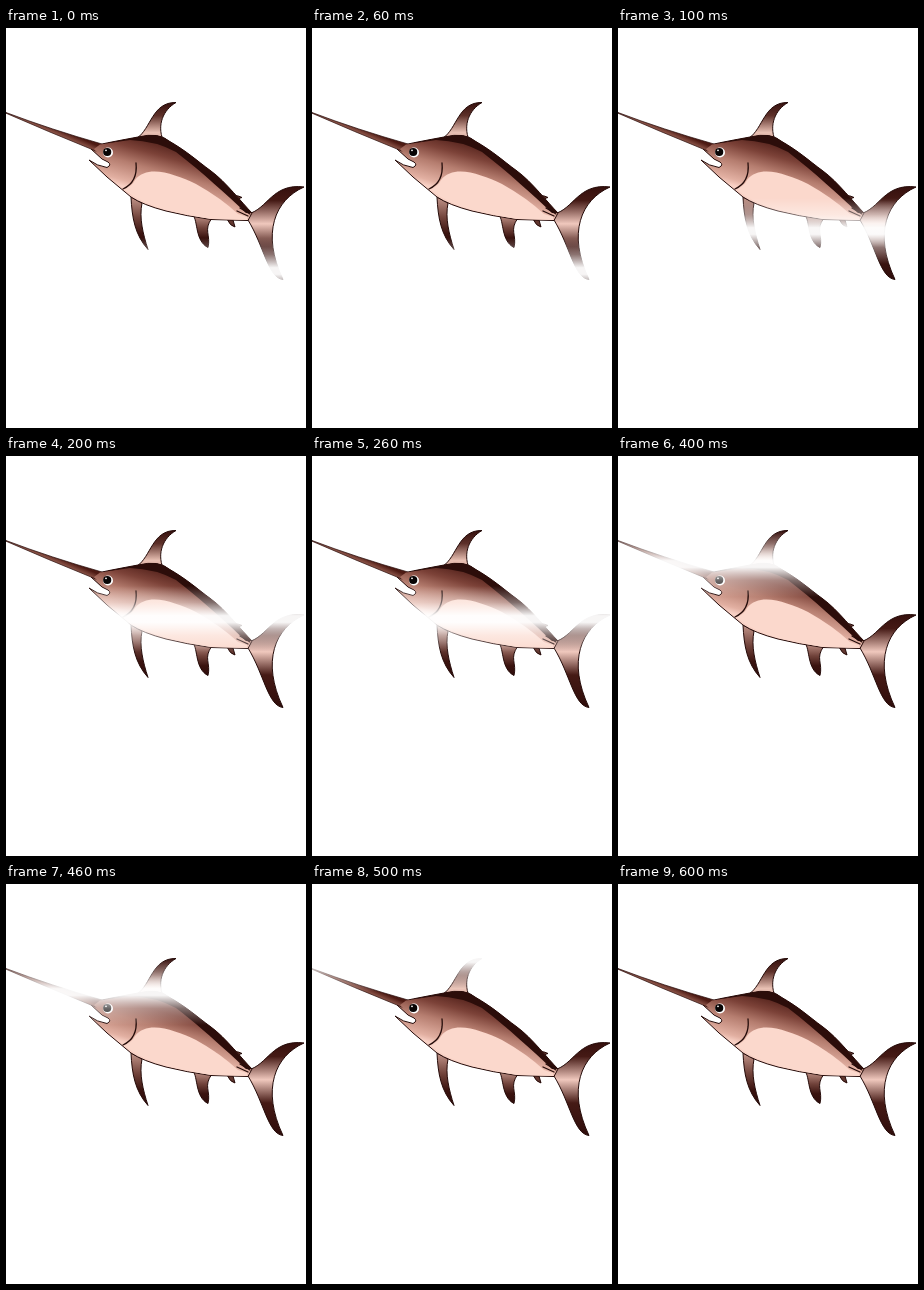
Animation, 300 px wide and 400 px high, one loop 0.7 s. Source, as an HTML page:

```html
<!DOCTYPE html>
<html lang="en">
<head>
<meta charset="utf-8">
<title>Shining swordfish</title>
<style>
  html, body { margin: 0; width: 100%; height: 100%; overflow: hidden; background: #fff; }
  svg { display: block; width: 300px; height: 400px; }
</style>
</head>
<body>
<svg viewBox="0 0 300 400">
  <defs>
    <linearGradient id="skin" gradientUnits="userSpaceOnUse" x1="147" y1="108" x2="132" y2="162">
      <stop offset="0" stop-color="#4a1a14"/>
      <stop offset=".3" stop-color="#7c4238"/>
      <stop offset=".57" stop-color="#b57d6f"/>
      <stop offset=".9" stop-color="#e2b0a2"/>
      <stop offset="1" stop-color="#f8d0c4"/>
    </linearGradient>
    <linearGradient id="bill" gradientUnits="userSpaceOnUse" x1="55" y1="102" x2="52" y2="109">
      <stop offset="0" stop-color="#4d1a13"/>
      <stop offset="1" stop-color="#a2695b"/>
    </linearGradient>
    <linearGradient id="dorsal" x2="0" y2="1">
      <stop offset="0" stop-color="#35100d"/>
      <stop offset=".35" stop-color="#5d3029"/>
      <stop offset=".8" stop-color="#e8c0b3"/>
      <stop offset="1" stop-color="#d9aaa0"/>
    </linearGradient>
    <linearGradient id="tail" x2="0" y2="1">
      <stop offset="0" stop-color="#35100d"/>
      <stop offset=".15" stop-color="#451a15"/>
      <stop offset=".4" stop-color="#f0c8bd"/>
      <stop offset=".65" stop-color="#451a15"/>
      <stop offset="1" stop-color="#2f0d0b"/>
    </linearGradient>
    <linearGradient id="fin" x2="0" y2="1">
      <stop offset="0" stop-color="#c2958a"/>
      <stop offset=".4" stop-color="#70423a"/>
      <stop offset=".7" stop-color="#3a130f"/>
      <stop offset="1" stop-color="#2f0d0b"/>
    </linearGradient>
    <linearGradient id="glow" x2="0" y2="1">
      <stop offset="0" stop-color="#fff" stop-opacity="0"/>
      <stop offset=".25" stop-color="#fff" stop-opacity=".4"/>
      <stop offset=".45" stop-color="#fff" stop-opacity=".96"/>
      <stop offset=".55" stop-color="#fff" stop-opacity=".96"/>
      <stop offset=".75" stop-color="#fff" stop-opacity=".4"/>
      <stop offset="1" stop-color="#fff" stop-opacity="0"/>
    </linearGradient>
  </defs>

  <g stroke="#240a08" stroke-linejoin="round">
    <path fill="url(#dorsal)" d="M131 110C145 101 146 74 170 74.500C157 82 151 97 157 112Z"/>
    <path fill="url(#tail)" d="M242 186C262 181 266 155 298 159C269 172 255 205 277 251.500C262 250 258 218 242 192Z"/>
    <path fill="url(#fin)" d="M125 169C126 190 129 207 142 221.500C137 206 133 190 136 175Z"/>
    <path fill="url(#fin)" d="M187 187C192 193 189 213 202 219.500C205 207 197 202 206 190Z"/>
    <path fill="#62372f" d="M221 191Q224 198 229 199L227 192ZM225 169Q229 166 236 169.500Q231 170 234 175Z"/>

    <path fill="url(#skin)" d="M96 116Q105 114 132 109Q153 104 163 113C182 124 190 132 205 143S236 175 246 185L242 192.500L205 191.500Q180 188 160 183Q137 177 125 169L101 149L83 132Q91 138 101 139.500Q106 137 102 134L96 131L85 121Z"/>
    <path fill="url(#bill)" stroke-width=".7" d="M0 84.500Q45 101.500 96 116L97 125Q92 124.500 85 121Q43 104 0 85.200Z"/>
  </g>

  <path fill="url(#skin)" d="M94 116.500L112 114L112 132L102 133L96 130L88 121Z"/>
  <path fill="#fbd8cc" d="M129 152C142 136 168 146 190 156Q215 170 232 186L241 189L241 192L205 191Q180 187 160 182Q135 175 119 162Q126 158 129 152Z"/>
  <path fill="#2c0d0a" d="M96 116L132 109Q153 104 163 113C182 124 190 132 205 143S236 175 246 185L240 185C222 168 196 144 170 124Q150 113 124 112Z"/>

  <g fill="none" stroke="#240c0a" stroke-width="1.300" stroke-linecap="round">
    <path d="M130 135Q132 154 117 161"/>
    <path d="M231 183L242 188M234 180L244 186"/>
  </g>

  <circle cx="102" cy="124.500" r="5" fill="#fff"/>
  <circle cx="101.200" cy="124" r="4.100" fill="#080404"/>
  <circle cx="100" cy="122.300" r=".9" fill="#fff"/>

  <rect id="shine" width="300" height="66" fill="url(#glow)"/>
</svg>
<script>
  const shine = document.getElementById("shine");
  const centers = [243, 203, 163, 134, 108, 75, 36];

  function draw() {
    const step = Math.floor(performance.now() % 700 / 100);
    shine.setAttribute("y", centers[step] - 33);
    requestAnimationFrame(draw);
  }
  draw();
</script>
</body>
</html>
```
